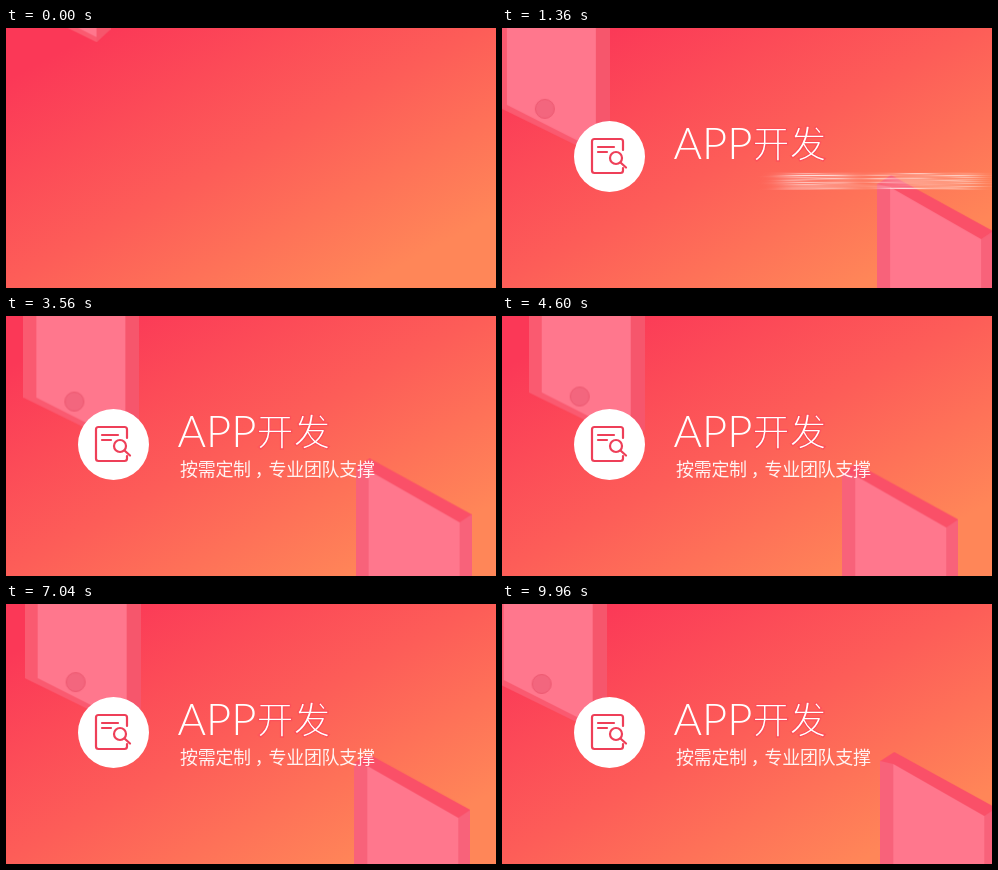
Recreate the animation shown at these times as an HTML page without scripts. Size 490 by 260 pixels, loop 10000 ms.

```html
<!DOCTYPE html>
<html lang="zh-CN">
<head>
<meta charset="utf-8">
<title>APP开发</title>
<style>
  html, body { margin: 0; width: 100%; height: 100%; overflow: hidden; }
  body { background: linear-gradient(to bottom right, #fb3857 10%, #fd5d58 49%, #ff8658 86%); }
  svg { display: block; width: 490px; height: 260px; }

  .sway { animation: sway 5s cubic-bezier(.37, 0, .63, 1) -9.64s infinite alternate; }
  .drift { animation: drift 10s infinite; }
  .badge { transform-origin: 107.5px 128.5px; animation: pop 10s infinite; }
  .title { animation: slide-title 10s infinite; }
  .subtitle { animation: slide-subtitle 10s infinite; }

  @keyframes sway {
    from { transform: translateX(-12px); }
    to { transform: translateX(29px); }
  }
  @keyframes drift {
    0% { transform: translateY(-112px); animation-timing-function: cubic-bezier(.215, .61, .355, 1); }
    23% { transform: translateY(10px); animation-timing-function: ease-in-out; }
    50% { transform: translateY(0); animation-timing-function: ease-out; }
    75% { transform: translateY(-2px); animation-timing-function: ease-in-out; }
    100% { transform: translateY(0); }
  }
  @keyframes pop {
    0%, 3% { transform: scale(0); animation-timing-function: ease-out; }
    8%, 100% { transform: scale(1); }
  }
  @keyframes slide-title {
    0%, 7% { transform: translateX(380px); animation-timing-function: cubic-bezier(.25, .46, .45, .94); }
    12%, 100% { transform: none; }
  }
  @keyframes slide-subtitle {
    0%, 11.4% { transform: translateX(380px); animation-timing-function: cubic-bezier(.25, .46, .45, .94); }
    16.3%, 100% { transform: none; }
  }

  text { fill: #fff; font-family: "Noto Sans CJK SC", "Noto Sans CJK", sans-serif; font-weight: 300; }
  .latin { font: 300 43.5px Lato, sans-serif; }
  /* a background-coloured outline thins the strokes */
  .hanzi { font-size: 37px; stroke: #fc5058; stroke-width: 1.3px; }
  .note { font-size: 18px; letter-spacing: -.3px; fill-opacity: .92; }
</style>
</head>
<body>
<svg viewBox="0 0 490 260">
  <defs>
    <filter id="title-blur" filterUnits="userSpaceOnUse" x="0" y="80" width="900" height="100">
      <feGaussianBlur stdDeviation="0 0">
        <animate attributeName="stdDeviation" dur="10s" repeatCount="indefinite"
          values="20 0;20 0;0 0;0 0" keyTimes="0;.07;.12;1"/>
      </feGaussianBlur>
    </filter>
    <filter id="subtitle-blur" filterUnits="userSpaceOnUse" x="0" y="120" width="900" height="80">
      <feGaussianBlur stdDeviation="0 0">
        <animate attributeName="stdDeviation" dur="10s" repeatCount="indefinite"
          values="20 0;20 0;0 0;0 0" keyTimes="0;.114;.163;1"/>
      </feGaussianBlur>
    </filter>
  </defs>

  <g class="sway"><g class="drift">
    <path d="M0-60H116V113L102 126 0 76Z" fill="#fa5a70"/>
    <path d="M102-60H116V113L102 126Z" fill="#f6566c"/>
    <path d="M13-60H102V121L13 76Z" fill="#ff778d"/>
    <circle cx="51" cy="80" r="9.500" fill="#f3667e" stroke="#ee5a72"/>
  </g></g>

  <!-- second phone: the same motion turned by half a circle -->
  <g transform="translate(483 268) rotate(180)">
    <g class="sway"><g class="drift">
      <path d="M0-60H116V111L102 120 0 64Z" fill="#fa5068"/>
      <path d="M0-60H12V56L0 64ZM103-60H116V111L103 108Z" fill="#f8627a"/>
      <path d="M12-60H103V108L12 56Z" fill="#ff778d"/>
    </g></g>
  </g>

  <g class="badge">
    <circle cx="107.5" cy="128.5" r="35.5" fill="#fff"/>
    <g fill="none" stroke="#ee3f58" stroke-width="2.2" stroke-linecap="round">
      <path d="M121 122V113.500Q121 111 118.500 111H92.500Q90 111 90 113.500V142.500Q90 145 92.500 145H118.500Q121 145 121 142.500V140"/>
      <path d="M96 119H112M96 124H105"/>
      <circle cx="114" cy="130" r="6" fill="#fff"/>
      <path d="M118.500 134.500L124 139.500"/>
    </g>
  </g>

  <g class="title"><g filter="url(#title-blur)">
    <text class="latin" x="171.500" y="131">APP</text>
    <text class="hanzi" x="250.500" y="129.500">开发</text>
  </g></g>

  <g class="subtitle"><g filter="url(#subtitle-blur)">
    <text class="note" x="174" y="159.500">按需定制<tspan dx="4">，</tspan><tspan dx="-4">专业团队支撑</tspan></text>
  </g></g>
</svg>
</body>
</html>
```
